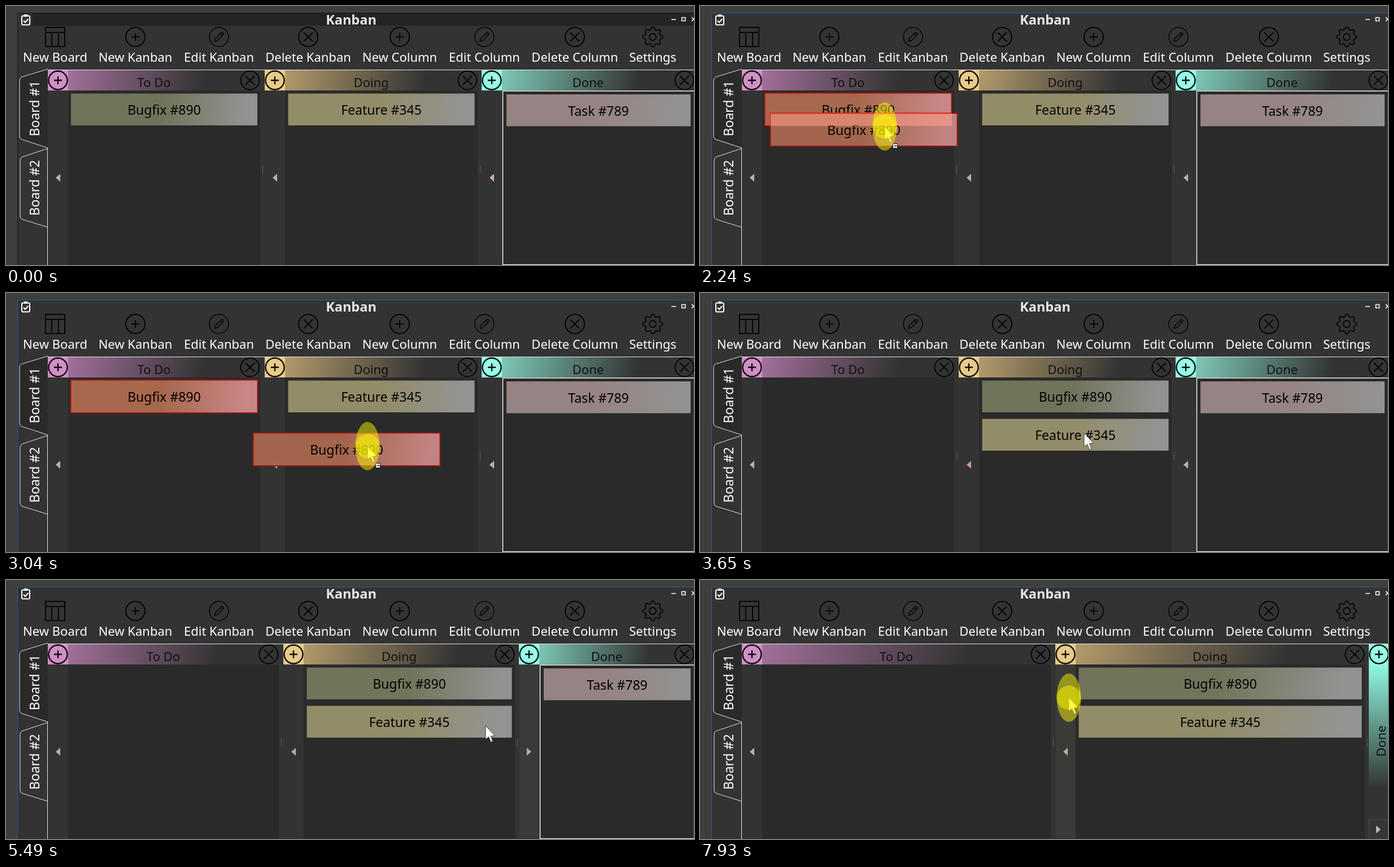
An HTML page for the animation above (8 s loop, 1218x460 px).

```html
<!DOCTYPE html>
<html lang="en">
<head>
<meta charset="utf-8">
<title>Kanban</title>
<style>
html, body { margin: 0; width: 100%; height: 100%; overflow: hidden; background: #403e3b; }
svg { display: block; font: 22px "Noto Sans", "Open Sans", sans-serif; text-anchor: middle; }
.icon { fill: none; stroke: #050505; stroke-width: 2; }
</style>
</head>
<body>
<svg id="stage" width="1218" height="460" viewBox="0 0 1218 460">
  <defs id="defs"></defs>
  <g id="back"></g>
  <g id="scene"></g>
</svg>
<script>
const LOOP = 8000, PANEL = '#333333', CONTENT = '#2a2a2a';
const PRESS = { x: 317, y: 178 };
const byId = id => document.getElementById(id);

// Pointer track: time, x, y. The pointer holds each place until the next time.
const track = [
  [800, 885, 340], [1000, 700, 268], [1210, 470, 206], [1420, 317, 178],
  [2030, 319, 190], [2240, 327, 214], [2440, 400, 252], [2640, 510, 282],
  [2840, 600, 287], [3040, 640, 272], [3250, 668, 257], [3450, 680, 249],
  [4250, 765, 255], [4470, 849, 259],
  [6290, 690, 250], [6510, 420, 223], [6710, 240, 213], [6910, 132, 236],
  [7110, 330, 264], [7310, 527, 248], [7530, 605, 222], [7730, 653, 209]
];
// Board widening as the last column folds away.
const fold = [[0, 0], [5490, .194], [5690, .75], [5890, 1]];
const changes = [...new Set([...track, ...fold, [1820], [3650], [5270], [7930]].map(k => k[0]))]
  .sort((a, b) => a - b);
const at = (keys, t) => keys.filter(k => k[0] <= t).pop();
const within = (t, a, b) => t >= a && t < b;

const rect = (x, y, w, h, fill, extra = '') =>
  `<rect x="${x}" y="${y}" width="${Math.max(0, w)}" height="${h}" fill="${fill}" ${extra}/>`;
const path = (d, extra = '') => `<path d="${d}" ${extra}/>`;
const text = (x, y, s, size = 22, fill = '#fff', extra = '') =>
  `<text x="${x}" y="${y}" font-size="${size}" fill="${fill}" ${extra}>${s}</text>`;
const upright = (x, y, s, size, fill) =>
  text(0, 0, s, size, fill, `transform="translate(${x} ${y}) rotate(-90)"`);
const icon = (x, y, body, width = 2) =>
  `<g class="icon" style="stroke-width:${width}" transform="translate(${x} ${y})">${body}</g>`;
const ring = (r = 17) => `<circle r="${r}"/>`;
const PLUS = path('M-7 0H7M0 -7V7'), CROSS = path('M-8 -8L8 8M8 -8L-8 8');

function gradient(id, from, to, start, end, vector = 'x2="1" y2=".022"') {
  return `<linearGradient id="${id}" x1="0" y1="0" ${vector}>
    <stop offset="${start}" stop-color="${from}"/><stop offset="${end}" stop-color="${to}"/></linearGradient>`;
}

byId('defs').innerHTML =
  gradient('todo', '#a3709b', PANEL, 0, .72) +
  gradient('doing', '#b29a6b', PANEL, 0, .74) +
  gradient('done', '#7cc8b6', PANEL, 0, .72) +
  gradient('folded', '#8ff8e0', PANEL, 0, .8, 'x2="0" y2="1"') +
  gradient('bugfix', '#71745b', '#929391', .5, .95) +
  gradient('feature', '#938c68', '#939392', .5, .95) +
  gradient('task', '#968383', '#929391', .45, 1) +
  gradient('picked', '#a8684e', '#c88786', .5, .95);

function gear() {
  let d = '';
  for (let i = 0; i < 32; i++) {
    const a = (i - .5) * Math.PI / 16, r = i % 4 < 2 ? 17.5 : 13.5;
    d += `${i ? 'L' : 'M'}${(r * Math.sin(a)).toFixed(1)} ${(-r * Math.cos(a)).toFixed(1)}`;
  }
  return path(d + 'Z', 'stroke-linejoin="round"') + ring(6);
}

function toolbar() {
  const pencil = ring() + path('M-8 8L-6.5 3L4.5 -8Q8 -8 8 -4.5L-3 6.5ZM2.5 -6L6 -2.5');
  const table = path('M-17 -17H17V17H-17ZM-17 -8H17M-6 -8V17M6 -8V17');
  const items = [
    [87, 'New Board', table], [229, 'New Kanban', ring() + PLUS],
    [377, 'Edit Kanban', pencil, 1.5], [535, 'Delete Kanban', ring() + CROSS],
    [697, 'New Column', ring() + PLUS], [847, 'Edit Column', pencil, 1.5],
    [1007, 'Delete Column', ring() + CROSS], [1145, 'Settings', gear(), 1.8]
  ];
  return items.map(([x, label, body, width]) => icon(x, 55, body, width) + text(x, 99, label)).join('');
}

function tabs() {
  const line = 'stroke="#e6e6e6" stroke-width="1"';
  return path('M74 112L28 126Q24 128 24 132V232Q24 235 28 237L74 252', `fill="${CONTENT}" ${line}`) +
    path('M74 253L29 268Q25 270 25 274V374Q25 377 29 379L74 393', `fill="${PANEL}" ${line}`) +
    path('M73.5 252V460M74 113.5H1218', `fill="none" ${line}`) +
    upright(58.5, 182, 'Board #1', 23, '#fff') + upright(58.5, 323, 'Board #2', 23, '#fff');
}

byId('back').innerHTML = rect(0, 0, 1218, 460, '#403e3b') +
  rect(20, 13, 1198, 447, PANEL) + toolbar() + tabs();

function titleBar(active) {
  return (active ? '' : rect(46, 13, 1172, 22, '#242424')) +
    path('M1218 12.5H20.5V460', `fill="none" stroke="${active ? '#235f9c' : '#161616'}"`) +
    text(611, 33, 'Kanban', 23.5, '#e8e8e8', 'font-weight="700"') +
    '<g fill="none" stroke="#fff" stroke-width="2">' +
    path('M30 17.5H40Q42 17.5 42 20V31Q42 33.5 40 33.5H30Q28 33.5 28 31V20Q28 17.5 30 17.5ZM31 26L34 29L39.5 23') +
    path('M32 17H38', 'stroke-width="4"') +
    path('M1178 24H1186M1196.5 20.5H1202.5V26.5H1196.5ZM1214 20L1221 27M1221 20L1214 27', 'stroke-width="1.6"') + '</g>';
}

const arrow = (x, y, dir, fill) => path(`M${x + 4 * dir} ${y}l${-8 * dir} -7v14z`, `fill="${fill}"`);

function strip(x, colour, hover) {
  return (hover ? rect(x, 150, 36, 310, '#3a3b39', 'stroke="#30302f"') : '') +
    rect(x, 114, 36, 36, colour) + icon(x + 18, 132, ring(16.5) + PLUS, 2.3);
}

function column(x, right, name, id, colour, look) {
  const left = x + 36, width = right - left;
  return rect(left, 150, width, 310, CONTENT) + strip(x, colour, look.hover) +
    rect(left, 114, width, 36, `url(#${id})`) +
    text((left + right - 36) / 2, 144, name, 22, '#111') +
    icon(right - 18, 132, ring(16.5) + CROSS) +
    arrow(x + 18, 305, look.dir || -1, look.arrow || '#c8abab') +
    (id === 'done' ? rect(left + 1.5, 151, 1217 - left, 308.5, 'none', 'stroke="#fff" stroke-width="1.4"')
      : path(`M${right + 4.5} 283V296`, 'stroke="#8c8c8c" stroke-dasharray="1 1"'));
}

function foldedColumn(x) {
  return strip(x, '#95ffe6') + rect(x, 150, 35, 275, 'url(#folded)') +
    upright(x + 30, 286, 'Done', 22, '#111') +
    rect(x + .5, 425.5, 36, 36, '#363636', 'stroke="#4a4a4a"') + arrow(x + 17, 443, 1, '#c4b8a6');
}

function card(x, y, w, label, fill, picked) {
  const body = picked
    ? rect(x - .5, y - 1, w + 1, 58.5, 'url(#picked)', 'stroke="#9c1515" stroke-width="2"')
    : rect(x, y, w, 56.5, `url(#${fill})`);
  return body + text(x + w / 2, y + 37.5, label, 23, '#000');
}

// The dragged copy glows where it still covers the card it came from.
function ghost(dx, dy) {
  const overlap = dy < 58 && dx < 330
    ? rect(114 + dx, 154.5 + dy, 332 - dx, 58.5 - dy, '#ff9e88', 'opacity=".55"') +
      path(`M${114 + dx} 213V${154.5 + dy}H446`, 'fill="none" stroke="#e03428" stroke-width="2"')
    : '';
  return `<g opacity=".96">${card(115 + dx, 155.5 + dy, 330, 'Bugfix #890', 'bugfix', true)}</g>` + overlap;
}

function pointer(x, y, pressed, dragging) {
  const glow = 'fill="#fff800" opacity=".48"';
  return `<g transform="translate(${x} ${y})">` +
    path('M0 0V24L5.5 19.5L9.5 29L13 27.5L9.2 18.3L16.5 17.5Z', 'fill="#fff" stroke="#222" stroke-width=".8"') +
    (dragging ? rect(14.5, 30.5, 8, 8, '#fff', 'stroke="#222"') +
      path('M16 34.5H21M19 32.5L21 34.5L19 36.5', 'fill="none" stroke="#111"') : '') +
    (pressed ? `<ellipse rx="21.5" ry="43" ${glow}/><circle r="21.5" ${glow}/>` : '') + '</g>';
}

function render(t) {
  const open = at(fold, t)[1], cursor = at(track, t);
  const doing = Math.round(458 + 171 * open), done = Math.round(842 + 342 * open);
  const picked = within(t, 1820, 3650), dragging = within(t, 2030, 3650), moved = t >= 3650;
  const pressed = picked || within(t, 5270, 5490) || t >= 7930;
  const tint = open ? '#b9b093' : '#c8abab';
  const cardX = doing + 41.5, cardWidth = done - doing - 54;

  let out = titleBar(t >= 1820) +
    column(74, doing - 8, 'To Do', 'todo', '#d18fc5', {}) +
    column(doing, done - 7, 'Doing', 'doing', '#e9ca88',
      { hover: t >= 7730, arrow: moved && !open ? '#c89890' : tint });

  if (open === 1) {
    out += foldedColumn(done);
  } else {
    out += column(done, 1219, 'Done', 'done', '#95ffe6',
      { hover: within(t, 4470, 5890), dir: open ? 1 : -1, arrow: tint }) +
      card(done + 44, 157, 1168 - done, 'Task #789', 'task');
  }

  out += moved ? card(cardX, 155.5, cardWidth, 'Bugfix #890', 'bugfix')
    : card(115, 155.5, 330, 'Bugfix #890', 'bugfix', picked);
  out += card(cardX, moved ? 223.5 : 155.5, cardWidth, 'Feature #345', 'feature');

  if (dragging) out += ghost(cursor[1] - PRESS.x, cursor[2] - PRESS.y);
  if (cursor) out += pointer(cursor[1], cursor[2], pressed, dragging);
  byId('scene').innerHTML = out;
}

let shown = -1;
const begin = performance.now();
function tick() {
  const t = (performance.now() - begin) % LOOP;
  const step = changes.filter(time => time <= t).length;
  if (step !== shown) render(t);
  shown = step;
  requestAnimationFrame(tick);
}
tick();
</script>
</body>
</html>
```
